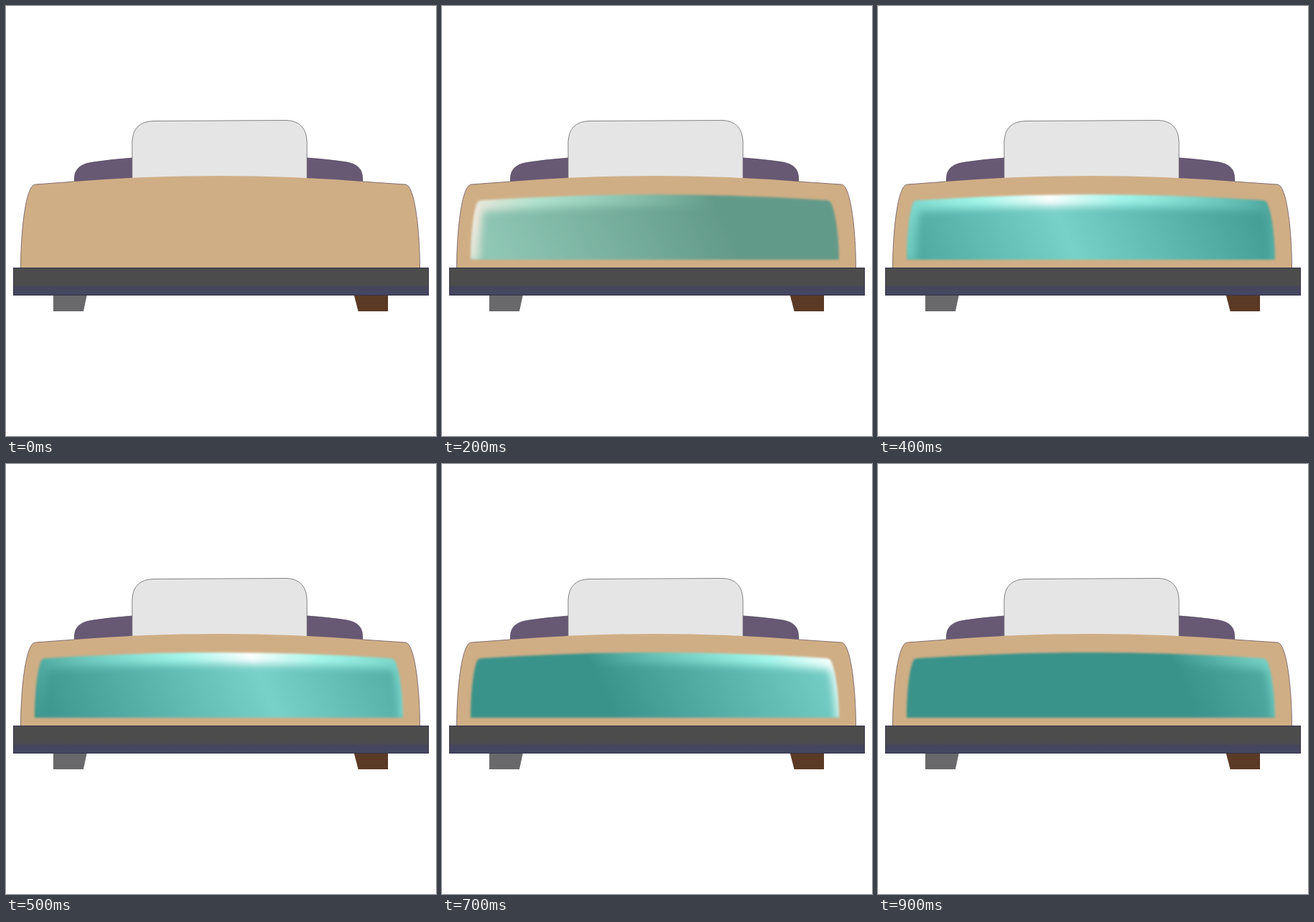
Write an HTML page that moves like this. It is 600 px wide and 600 px high and loops after 1 s.

```html
<!DOCTYPE html>
<html lang="en">
<head>
<meta charset="utf-8">
<title>Bed glow</title>
<style>
  html, body { margin: 0; width: 100%; height: 100%; overflow: hidden; background: #fff; }
  svg { display: block; width: 100vw; height: 100vh; }
</style>
</head>
<body>
<svg viewBox="0 0 600 600">
  <defs>
    <filter id="soft" filterUnits="userSpaceOnUse" x="0" y="220" width="600" height="180" color-interpolation-filters="sRGB">
      <feGaussianBlur stdDeviation="1.7"/>
    </filter>
    <filter id="wide" filterUnits="userSpaceOnUse" x="0" y="200" width="600" height="220" color-interpolation-filters="sRGB">
      <feGaussianBlur stdDeviation="6"/>
    </filter>
    <linearGradient id="rail" x2="0" y2="1">
      <stop offset="0" stop-color="#4c4c4c"/>
      <stop offset=".62" stop-color="#4c4c4c"/>
      <stop offset=".72" stop-color="#45465c"/>
      <stop offset="1" stop-color="#454662"/>
    </linearGradient>
    <!-- x runs from -1 to 1 around the light, leaning with height -->
    <linearGradient id="body" class="light" gradientUnits="userSpaceOnUse" x1="-1" x2="1" y1="0" y2="0">
      <stop offset="0" stop-color="#77d1c8" stop-opacity="0"/>
      <stop offset=".5" stop-color="#77d1c8"/>
      <stop offset="1" stop-color="#77d1c8" stop-opacity="0"/>
    </linearGradient>
    <linearGradient id="shine" class="light" gradientUnits="userSpaceOnUse" x1="-1" x2="1" y1="0" y2="0">
      <stop offset="0" stop-color="#a0fbec" stop-opacity="0"/>
      <stop offset=".2" stop-color="#a0fbec" stop-opacity=".48"/>
      <stop offset=".36" stop-color="#aefff3" stop-opacity=".86"/>
      <stop offset=".5" stop-color="#fff"/>
      <stop offset=".64" stop-color="#aefff3" stop-opacity=".86"/>
      <stop offset=".8" stop-color="#a0fbec" stop-opacity=".48"/>
      <stop offset="1" stop-color="#a0fbec" stop-opacity="0"/>
    </linearGradient>
    <mask id="panel" maskUnits="userSpaceOnUse" x="0" y="220" width="600" height="180">
      <path fill="#fff" filter="url(#soft)" d="M40 354C40 325 43 285 50 273Q52 271 57 271Q300 255 535 271Q541 271 543 275C550 290 554 325 554 354Z"/>
    </mask>
    <mask id="bevel" maskUnits="userSpaceOnUse" x="0" y="200" width="600" height="220">
      <g fill="none" stroke="#fff" filter="url(#wide)">
        <path stroke-width="32" d="M44 271Q300 255 550 271"/>
        <path stroke-width="24" d="M40 356C40 325 43 285 50 271"/>
        <path stroke-width="13" d="M543 271C550 290 556 325 556 356"/>
      </g>
    </mask>
  </defs>

  <path fill="#675974" stroke="#4b4058" stroke-width=".7" d="M95.500 246V240C96 226 106 220 121 218Q148 214 176 212H421Q450 214 473 217.500C490 220 497.500 227 497.500 241V246Z"/>
  <path fill="#e5e5e5" stroke="#66666e" stroke-width=".8" d="M176 243V190Q177 161 206 160.500L392 159.500Q419 161 420 190V243Z"/>
  <path fill="#d0ae85" d="M20.500 366C20.500 318 27 249 41 249L95 245Q300 229 498 245L557 249C571 249 577.500 318 577.500 366Z"/>
  <path fill="none" stroke="#6a5560" stroke-width=".8" d="M20.500 366C20.500 318 27 249 41 249L95 245M498 245L557 249C571 249 577.500 318 577.500 366"/>

  <g id="glow" mask="url(#panel)">
    <rect y="240" width="600" height="130" fill="#39938b"/>
    <rect y="240" width="600" height="130" fill="url(#body)"/>
    <g mask="url(#bevel)">
      <rect y="240" width="600" height="130" fill="url(#shine)"/>
    </g>
  </g>

  <path fill="#69696b" d="M66 403H113L108 426H66Z"/>
  <path fill="#5b3a25" d="M485.500 403H533V426H491.500Z"/>
  <rect x="10.500" y="365.500" width="579" height="38" fill="url(#rail)" stroke="#34324a"/>
</svg>
<script>
  const LOOP = 1000, STEP = 100, REACH = 345, LEAN = 0.45;
  const glow = document.getElementById("glow");
  const lights = document.querySelectorAll(".light");

  function draw(time) {
    const step = Math.floor((time % LOOP) / STEP);
    const x = -45 + 102.5 * (step - 1);
    const opacity = step ? Math.min(1, 0.16 + 0.28 * step) : 0;
    const place = `matrix(${REACH} 0 ${LEAN} 1 ${x - LEAN * 320} 0)`;
    glow.setAttribute("opacity", opacity);
    lights.forEach(light => light.setAttribute("gradientTransform", place));
  }

  const start = performance.now();
  function tick() {
    draw(performance.now() - start);
    requestAnimationFrame(tick);
  }
  tick();
</script>
</body>
</html>
```
